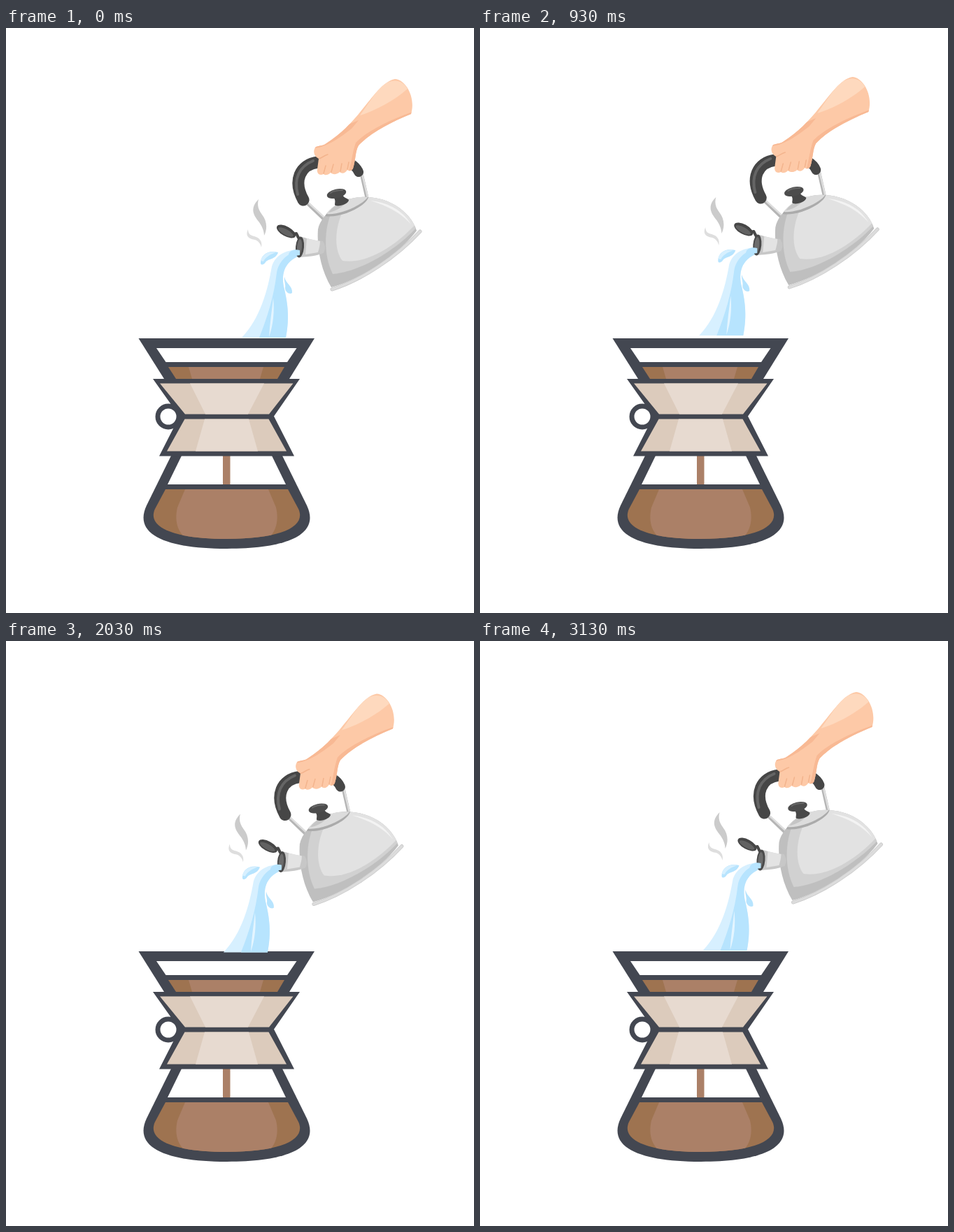
An HTML page for the animation above (5.01 s loop, 669 by 837 pixels).

```html
<!DOCTYPE html>
<html lang="en">
<head>
<meta charset="utf-8">
<title>Pour-over coffee</title>
<style>
  html, body { margin: 0; width: 100%; height: 100%; overflow: hidden; background: #fff; }
  svg { display: block; width: 100%; height: 100%; }
  .line { fill: none; stroke-linecap: round; stroke-linejoin: round; }
</style>
</head>
<body>
<svg viewBox="0 0 669 837">
  <defs>
    <clipPath id="bodyClip"><path id="bodyShape" d="M446 288C450 266 480 243 516 242C551 243 579 265 587 290C560 326 506 360 465 371C450 346 444 314 446 288Z"/></clipPath>
    <clipPath id="coffeeClip"><path id="coffeeShape" d="M228 660H403L418 688C430 714 392 731 315.500 731C239 731 201 714 213 688Z"/></clipPath>
    <clipPath id="armClip"><path id="armShape" d="M556 73C572 74 586 100 579 123C552 134 522 149 504 168C499 177 500 189 496 201C494 205 490 205 488 203C485 208 480 209 477 206C473 210 467 210 464 207C460 211 456 211 454 209C448 212 444 208 445 202L447 187C440 184 438 175 443 170C448 168 453 169 458 165C478 152 494 136 508 118C524 99 539 76 556 73Z"/></clipPath>
  </defs>

  <g id="brewer">
    <circle cx="232" cy="556" r="15" fill="#fff" stroke="#434751" stroke-width="7"/>
    <path d="M189.500 444H441L405 502H226Z" fill="#434751"/>
    <path d="M215 458H415.500L402 478H228.500Z" fill="#fff"/>
    <path d="M232 485H398L388 502H243Z" fill="#9e7350"/>
    <path d="M261 485H368L363 502H266Z" fill="#ab8067"/>

    <path d="M236 612L201 683C182 723 224 745 315.500 745C407 745 449 723 430 683L395 612Z" fill="#434751"/>
    <path d="M251 612H380L400 653H231Z" fill="#fff"/>
    <path d="M310 612H320.500V653H310Z" fill="#ab8067"/>
    <use href="#coffeeShape" fill="#9e7350"/>
    <path clip-path="url(#coffeeClip)" d="M256 660H375L386 686C390 704 387 720 374 731H258C244 720 241 704 245 686Z" fill="#ab8067"/>

    <path d="M210 502H420L383 555.500L412 612.500H219L248 555.500Z" fill="#434751"/>
    <path d="M220 508.500H410.500L376 552.500H256Z M255.500 559.500H375.500L401 605.500H230Z" fill="#dccbbc"/>
    <path d="M263 508.500H369L346 552.500H285Z M284 559.500H347L360 605.500H271Z" fill="#e7dad0"/>
  </g>

  <g id="pour">
    <g id="steam">
      <path d="M361 245C347 259 355 269 362 278C366 284 369 290 369 297C374 287 373 276 366 267C360 259 359 253 361 245Z" fill="#cbcbcb"/>
      <path d="M346 288C341 299 349 302 356 303C361 305 364 309 365 314C367 305 362 300 355 298C349 297 346 294 346 288Z" fill="#dedede"/>
    </g>

    <g id="water">
      <path d="M421 317C402 317 386 323 380 341C374 376 363 416 337 443H400C406 414 402 391 398 374C393 354 396 335 421 325Z" fill="#d7f0ff"/>
      <path d="M421 318C403 321 390 333 387 350C383 384 374 413 362 443H400C406 414 402 391 398 374C393 354 396 335 421 325Z" fill="#b7e4fe"/>
      <path d="M382 386C384 405 382 425 376 442C377 423 380 405 382 386Z" fill="#e4f5ff"/>
      <path d="M364 336C364 325 374 317 389 321C386 331 375 330 371 335C369 339 364 340 364 336Z" fill="#b7e4fe"/>
      <path d="M364 333C367 323 376 319 386 321C377 324 371 328 368 334Z" fill="#d7f0ff"/>
      <path d="M398 356C400 366 410 369 409 379C406 382 399 378 399 372C400 366 397 362 398 356Z" fill="#b7e4fe"/>
    </g>

    <g id="kettle">
      <path class="line" d="M427 247L453 272M508 208L516 243" stroke="#b5b5b5" stroke-width="5"/>
      <path class="line" d="M429 247L455 271M509 208L517 242" stroke="#dedede" stroke-width="2.500"/>
      <use href="#bodyShape" fill="#bfbfbf"/>
      <g clip-path="url(#bodyClip)">
        <path d="M466 262C454 288 454 326 467 352C508 349 562 314 588 284V235H500Z" fill="#d1d1d1"/>
        <path d="M483 259C470 284 468 317 481 333C518 339 562 307 586 280V230H510Z" fill="#e2e2e2"/>
        <path d="M521 247C550 250 569 264 579 281C564 264 546 255 521 247Z" fill="#f3f3f3"/>
      </g>
      <path class="line" d="M466 374C508 361 558 328 592 291" stroke="#c9c9c9" stroke-width="5"/>
      <path class="line" d="M466 374C508 361 558 328 592 291" stroke="#dcdcdc" stroke-width="3.500"/>
      <path d="M456 269C466 252 493 240 518 242C515 255 478 273 456 269Z" fill="#ababab"/>
      <path d="M458 266C468 251 493 240 517 242C511 252 479 268 458 266Z" fill="#dcdcdc"/>
      <path d="M461 264C469 253 481 247 491 244C485 253 474 262 461 264Z" fill="#c5c5c5"/>
      <path d="M467 241L481 237C481 243 488 243 490 246C490 252 473 257 470 253C470 249 472 246 467 241Z" fill="#484848"/>
      <ellipse cx="472.500" cy="237" rx="14" ry="6.500" transform="rotate(-13 472.500 237)" fill="#4c4c4c"/>
      <path class="line" d="M464 236C469 232 475 232 481 232" stroke="#666" stroke-width="2"/>

      <path d="M423 299C434 302 444 305 453 305C457 311 457 317 454 322C444 326 433 327 421 328Z" fill="#c7c7c7"/>
      <path d="M430 301L449 305C449 311 447 317 446 321L428 324Z" fill="#e3e3e3"/>
      <ellipse cx="420" cy="313.500" rx="6" ry="15" transform="rotate(5 420 313.500)" fill="#4a4a4a"/>
      <ellipse cx="419.500" cy="313.500" rx="3.500" ry="11.500" transform="rotate(5 419.500 313.500)" fill="#6c6c6c"/>
      <path d="M404 324C405 318 413 316 420 318L420 325C413 326 408 327 404 329Z" fill="#b7e4fe"/>
      <path class="line" d="M408 296L415 294L418 300" stroke="#484848" stroke-width="4"/>
      <ellipse cx="400.500" cy="291" rx="15" ry="7" transform="rotate(29 400.500 291)" fill="#464646"/>
      <ellipse cx="400" cy="292" rx="12" ry="4" transform="rotate(29 400 292)" fill="#626262"/>

      <path class="line" d="M446 192C420 195 410 219 425 246" stroke="#464646" stroke-width="17"/>
      <path class="line" d="M439 190C419 198 411 216 417 238" stroke="#656565" stroke-width="4"/>
      <path class="line" d="M493 194C498 197 502 201 504 206" stroke="#464646" stroke-width="14"/>
    </g>

    <g id="arm">
      <use href="#armShape" fill="#fdc9a7"/>
      <g clip-path="url(#armClip)">
        <path d="M590 117C548 131 514 149 500 164C495 178 494 194 488 213H505L515 165L590 130Z" fill="#f8b994"/>
        <path d="M438 172C456 172 476 158 494 144L504 132L480 142L438 165Z" fill="#f8b994"/>
        <path d="M574 87C564 70 546 74 534 86C523 100 514 114 506 125C526 119 554 105 574 87Z" fill="#fed9be"/>
        <path class="line" d="M447 187C452 186 455 182 460 181M465 206L468 195M478 205L480 194M488 202L490 192M454 208L457 197" stroke="#f3b48d" stroke-width="1.500"/>
      </g>
    </g>
  </g>
</svg>
<script>
const LOOP = 5010;
const FRAME = 100 / 3;
const pour = document.getElementById("pour");

// Swing path: time in ms, x, y.
const path = [
  [0, 0, 0], [330, -54, -1], [510, -94, -0.5], [930, -24, -3],
  [1075, -15.5, -3.5], [1250, -26, -3], [1470, -59, -1.5], [1590, -94, 0.5],
  [2030, -26.5, 2.5], [2145, -15, 1], [2380, -56, -3.5], [2600, -97, -2],
  [2680, -103, -1.5], [3130, -18.5, 0]
];

function rise(i, axis) {
  return (path[i + 1][axis] - path[i][axis]) / (path[i + 1][0] - path[i][0]);
}

// Slope that never overshoots: zero at turning points, harmonic mean elsewhere.
function slope(i, axis) {
  if (i === 0 || i === path.length - 1) return 0.6 * rise(Math.max(0, i - 1), axis);
  const before = rise(i - 1, axis), after = rise(i, axis);
  return before * after <= 0 ? 0 : 2 * before * after / (before + after);
}

function positionAt(time, axis) {
  const last = path.length - 1;
  if (time >= path[last][0]) return path[last][axis];
  const i = path.findIndex(p => p[0] > time) - 1;
  const span = path[i + 1][0] - path[i][0];
  const u = (time - path[i][0]) / span;
  const ease = u * u * (3 - 2 * u);
  return path[i][axis] * (1 - ease) + path[i + 1][axis] * ease
    + span * u * (1 - u) * (slope(i, axis) * (1 - u) - slope(i + 1, axis) * u);
}

const start = performance.now();

function draw() {
  const elapsed = (performance.now() - start) % LOOP;
  const time = Math.floor((elapsed + 4) / FRAME) * FRAME;
  pour.setAttribute("transform", `translate(${positionAt(time, 1)} ${positionAt(time, 2)})`);
  requestAnimationFrame(draw);
}
draw();
</script>
</body>
</html>
```
